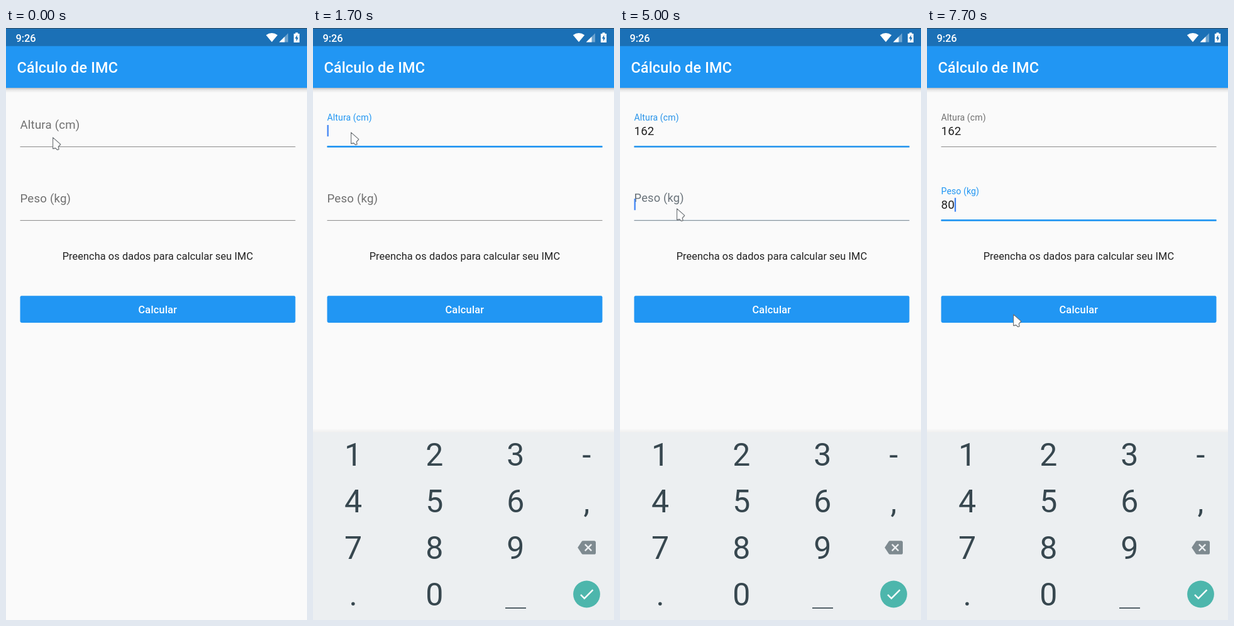
Write an HTML page that moves like this. It is 479 px wide and 940 px high and loops after 8000 ms.

```html
<!DOCTYPE html>
<html lang="pt">
<head>
<meta charset="utf-8">
<title>Cálculo de IMC</title>
<style>
  html, body { margin: 0; width: 100%; height: 100%; overflow: hidden; background: #fafafa; }
  svg { display: block; width: 100%; height: 100%; font-family: Roboto, sans-serif; }
  .medium { font-weight: 500; fill: #fff; }
  .mid { text-anchor: middle; }
  .field { letter-spacing: .0094em; }
  .keys text { font-size: 50px; text-anchor: middle; fill: #37474f; }
</style>
</head>
<body>
<svg viewBox="0 0 479 940">
  <defs>
    <linearGradient id="barShade" x2="0" y2="1">
      <stop stop-color="#000" stop-opacity=".24"/>
      <stop offset=".4" stop-color="#000" stop-opacity=".08"/>
      <stop offset="1" stop-color="#000" stop-opacity="0"/>
    </linearGradient>
    <linearGradient id="keyShade" x2="0" y2="1">
      <stop stop-color="#000" stop-opacity="0"/>
      <stop offset="1" stop-color="#000" stop-opacity=".045"/>
    </linearGradient>
  </defs>

  <rect width="479" height="940" fill="#fafafa"/>
  <rect y="95" width="479" height="8" fill="url(#barShade)"/>
  <rect width="479" height="95" fill="#2196f3"/>
  <rect width="479" height="28.7" fill="#1b70b6"/>
  <rect width="479" height="1" fill="#2b4a63"/>
  <text class="medium" x="15.4" y="21.6" font-size="16.4">9:26</text>
  <g fill="#fff">
    <path d="M413.8 11.3Q423 4.8 432.2 11.3L423 22.3Z"/>
    <path d="M449 8.2V22.5H434.7Z" opacity=".35"/>
    <path d="M443.5 13.7V22.5H434.7Z"/>
    <path d="M460.5 7.3h4v1.6h2.6v14.2h-9.2V8.9h2.6Z"/>
  </g>
  <path d="M463.3 11L459.8 16.8H462V21L465.3 15.2H463.3Z" fill="#1b70b6"/>
  <text class="medium" x="17.4" y="71" font-size="23.5" letter-spacing=".13">Cálculo de IMC</text>

  <g id="fields"></g>

  <text class="mid" x="241.4" y="367.8" font-size="16.4" letter-spacing=".05" fill="#212121">Preencha os dados para calcular seu IMC</text>
  <rect x="22.5" y="425.2" width="438" height="42.8" rx="2.4" fill="#2196f3"/>
  <text class="medium mid" x="241.4" y="452.8" font-size="16.4" letter-spacing=".2">Calcular</text>

  <g id="keyboard">
    <rect y="636" width="479" height="6" fill="url(#keyShade)"/>
    <rect y="642" width="479" height="350" fill="#eceff1"/>
    <g class="keys" id="keys"></g>
    <rect x="306" y="920" width="33" height="2" fill="#546269"/>
    <path transform="translate(421.2 810.6) scale(1.2)" fill="#7e8a90" d="M22 3H7c-.69 0-1.23.35-1.59.88L0 12l5.41 8.11c.36.53.9.89 1.59.89h15c1.1 0 2-.9 2-2V5c0-1.1-.9-2-2-2zm-3 12.59L17.59 17 14 13.41 10.41 17 9 15.59 12.59 12 9 8.41 10.41 7 14 10.59 17.59 7 19 8.41 15.41 12z"/>
    <circle cx="435.5" cy="899" r="21.4" fill="#4db6ac"/>
    <path transform="translate(421.1 884.6) scale(1.2)" fill="#fff" d="M9 16.17L4.83 12l-1.42 1.41L9 19 21 7l-1.41-1.41z"/>
  </g>

  <g id="pointer">
    <path d="M1.5 2V20L5.5 18.7L8.7 21.5L11 20.5L10 16.7L13.8 13Z" fill="#000" opacity=".12"/>
    <path d="M.6 .8V18.6L4.7 17.6L7.6 20.5L10.1 19.4L9.2 15.6L12.8 11.7Z" fill="#fcfcfc" stroke="#6b7074" stroke-width="1.1" stroke-linejoin="round"/>
  </g>
</svg>
<script>
const LOOP = 8000, STEP = 100, BLINK = 500;
const LEFT = 22.5, DIGIT = 10.65;
const BLUE = [33, 150, 243], GREY = [112, 112, 112];
const FOCUS_HEIGHT = 800, FOCUS_WEIGHT = 4900;
const byId = id => document.getElementById(id);

function set(node, attrs) {
  for (const name in attrs) node.setAttribute(name, attrs[name]);
}

function add(parent, tag, attrs, text = '') {
  const node = document.createElementNS('http://www.w3.org/2000/svg', tag);
  set(node, attrs);
  node.textContent = text;
  return parent.appendChild(node);
}

const lerp = (a, b, k) => a + (b - a) * k;
const mix = (a, b, k) => `rgb(${a.map((v, i) => Math.round(lerp(v, b[i], k)))})`;
const progress = (t, from, to) => Math.min(1, Math.max(0, (t - from) / (to - from)));
const smooth = u => u * u * (3 - 2 * u);
const easeOut = u => 1 - (1 - u) ** 2;

// Typed part of a word, and a caret that restarts its blink at every key.
function typing(t, { word, start, gap, blinkFrom }) {
  const count = Math.min(word.length, Math.max(0, Math.floor((t - start) / gap) + 1));
  const lastKey = count ? start + (count - 1) * gap : blinkFrom;
  return { text: word.slice(0, count), blinkOn: Math.floor((t - lastKey) / BLINK) % 2 === 0 };
}

function makeField(name, y) {
  const root = add(byId('fields'), 'g', { transform: `translate(0 ${y})` });
  const line = { x: LEFT, width: 438 };
  add(root, 'rect', { ...line, y: 188, height: 1.1, fill: '#929292' });
  const active = add(root, 'rect', { ...line, y: 187, height: 2.7, fill: '#2196f3' });
  const label = add(root, 'text', { class: 'field', x: LEFT }, name);
  const value = add(root, 'text', { class: 'field', x: LEFT, y: 169.9, 'font-size': 18.7, fill: '#212121' });
  const caret = add(root, 'rect', { width: 2.3, fill: '#4285f4' });

  return ({ focus, float, text, caretOn }) => {
    set(active, { opacity: focus });
    set(label, {
      y: lerp(160.4, 146.5, float),
      'font-size': lerp(18.7, 14.03, float),
      fill: mix(GREY, BLUE, focus)
    });
    value.textContent = text;
    set(caret, {
      x: LEFT + DIGIT * text.length,
      y: text ? 152.7 : 154,
      height: text ? 22 : 18.2,
      opacity: +caretOn
    });
  };
}

const drawHeight = makeField('Altura (cm)', 0);
const drawWeight = makeField('Peso (kg)', 117);

['123-', '456,', '789', '.0'].forEach((row, r) => [...row].forEach((key, c) =>
  add(byId('keys'), 'text', { x: Math.min(64 + 129.2 * c, 435.5), y: 694.8 + 74 * r }, key)));

const heightInput = { word: '162', start: 2700, gap: 750, blinkFrom: 600 };
const weightInput = { word: '80', start: 6500, gap: 100, blinkFrom: FOCUS_WEIGHT };

// Each leg eases to a resting point; a bend swings the path up and left.
const legs = [
  { from: 1100, to: 1700, x: 60, y: 165 },
  { from: 1900, to: 2300, x: 57, y: 164 },
  { from: 2600, to: 2800, x: 45, y: 171 },
  { from: 4000, to: 4500, x: 90, y: 286 },
  { from: 6900, to: 7700, x: 137, y: 454, bendX: 113, bendY: 150 }
];

function pointerAt(t) {
  let x = 74, y = 173;
  for (const leg of legs) {
    const k = smooth(progress(t, leg.from, leg.to));
    const swing = Math.sin(Math.PI * k);
    x = lerp(x, leg.x, k) - (leg.bendX || 0) * swing;
    y = lerp(y, leg.y, k) - (leg.bendY || 0) * swing;
  }
  return [x, y];
}

function render(now) {
  const t = Math.floor(now % LOOP / STEP) * STEP;
  const shift = smooth(progress(t, FOCUS_WEIGHT + 60, FOCUS_WEIGHT + 300));
  const started = t >= FOCUS_HEIGHT ? 1 : 0;
  const onWeight = t >= FOCUS_WEIGHT;
  const height = typing(t, heightInput);
  const weight = typing(t, weightInput);

  drawHeight({
    focus: started * (1 - shift),
    float: started,
    text: height.text,
    caretOn: started && !onWeight && height.blinkOn
  });
  drawWeight({
    focus: shift,
    float: shift,
    text: weight.text,
    caretOn: onWeight && weight.blinkOn
  });

  const shown = easeOut(progress(t, 900, 1160));
  set(byId('keyboard'), { opacity: shown, transform: `translate(0 ${52 * (1 - shown)})` });
  set(byId('pointer'), { transform: `translate(${pointerAt(t)})` });
}

const start = performance.now();
function tick() {
  render(performance.now() - start);
  requestAnimationFrame(tick);
}
tick();
</script>
</body>
</html>
```
